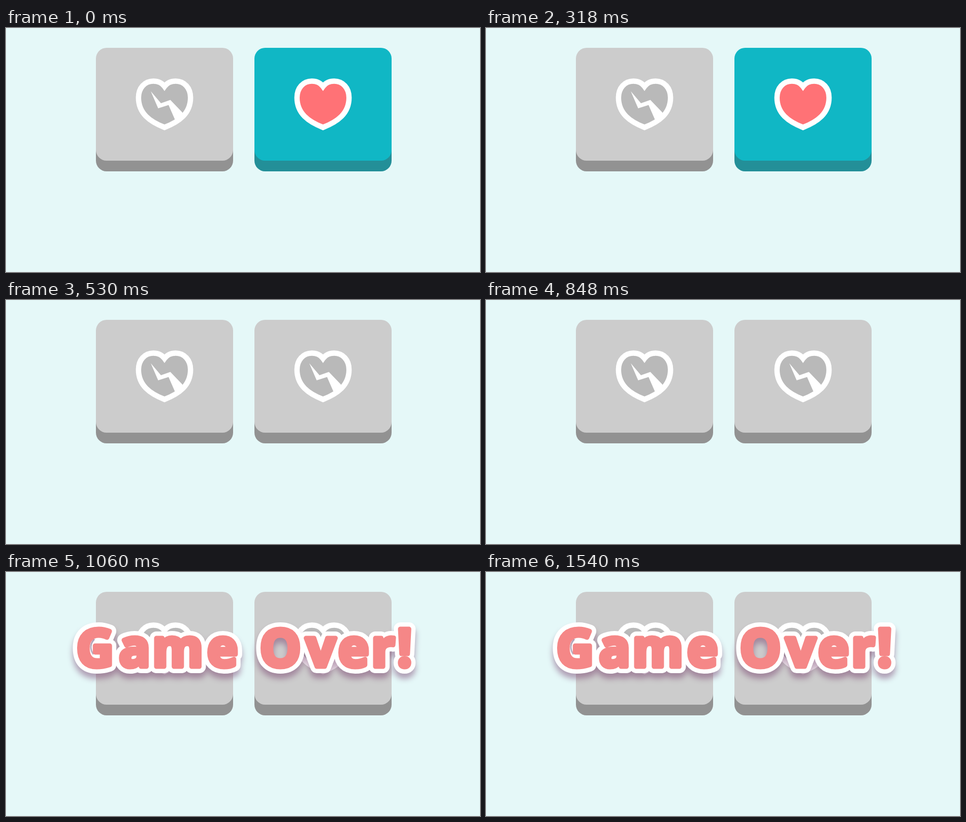
An HTML page with a canvas that plays this animation: 933 px wide and 480 px high, repeating every 1.86 s.

```html
<!DOCTYPE html>
<html lang="en">
<head>
<meta charset="utf-8">
<title>Game Over</title>
<style>
  html, body { margin: 0; width: 100%; height: 100%; overflow: hidden; background: #e5f8f8; }
  canvas { display: block; }
</style>
</head>
<body>
<canvas id="stage" width="933" height="480"></canvas>
<script>
const LOOP = 1860, LOSE_AT = 530, OVER_AT = 1060;
const ALIVE = { top: '#10b7c5', side: '#238f98', heart: '#ff7276' };
const LOST = { top: '#cccccc', side: '#929292', heart: '#b9b9b9' };
const stage = document.getElementById('stage');
const ctx = stage.getContext('2d');

function roundBox(x, y, w, h, r, color) {
  ctx.fillStyle = color;
  ctx.beginPath();
  ctx.roundRect(x, y, w, h, r);
  ctx.fill();
}

function heartPath() {
  ctx.beginPath();
  ctx.moveTo(0, 115);
  ctx.bezierCurveTo(5, 108, 13, 104.5, 22, 104.5);
  ctx.bezierCurveTo(39, 104.5, 51.2, 118, 51.2, 137);
  ctx.bezierCurveTo(51.2, 168, 29, 184, 0, 195.5);
  ctx.bezierCurveTo(-29, 184, -51.2, 168, -51.2, 137);
  ctx.bezierCurveTo(-51.2, 118, -39, 104.5, -22, 104.5);
  ctx.bezierCurveTo(-13, 104.5, -5, 108, 0, 115);
  ctx.closePath();
}

function crack() {
  const points = [[-27, 124.5], [-7, 148], [11.5, 141.5], [35, 166], [38, 172],
                  [24, 184], [20, 179], [8, 151.5], [-12.5, 158]];
  ctx.beginPath();
  points.forEach(([x, y]) => ctx.lineTo(x, y));
  ctx.fillStyle = '#fff';
  ctx.fill();
}

function card(left, look) {
  roundBox(left, 60, 270, 222, 21, look.side);
  roundBox(left, 39, 270, 222, 21, look.top);
  ctx.save();
  ctx.translate(left + 135, 0);
  heartPath();
  ctx.fillStyle = look.heart;
  ctx.fill();
  if (look === LOST) crack();
  heartPath();
  ctx.strokeStyle = '#fff';
  ctx.lineWidth = 10.5;
  ctx.stroke();
  ctx.restore();
}

// Rounded lettering: a bold face fattened by a round stroke, on a white outline.
function makeTitle() {
  const layer = document.createElement('canvas');
  layer.width = stage.width;
  layer.height = stage.height;
  const g = layer.getContext('2d');
  const text = 'GameOver!';
  const centers = [174, 251.5, 338, 426, 540, 620, 684, 745, 784.5];
  const fatten = 9, outline = 8.5, baseline = 185.5;
  g.font = '700 102px "Open Sans", "Noto Sans", sans-serif';
  g.lineJoin = 'round';

  function eachLetter(draw) {
    [...text].forEach((ch, i) => {
      const m = g.measureText(ch);
      draw(ch, centers[i] - (m.actualBoundingBoxRight - m.actualBoundingBoxLeft) / 2);
    });
  }

  g.strokeStyle = '#fff';
  g.lineWidth = fatten + 2 * outline;
  eachLetter((ch, x) => g.strokeText(ch, x, baseline));

  // Openings inside the capitals
  g.globalCompositeOperation = 'destination-out';
  g.beginPath();
  g.ellipse(540, 147, 17, 24, 0, 0, 2 * Math.PI);
  g.fill();
  g.lineWidth = 3;
  g.beginPath();
  g.moveTo(174, 132);
  g.quadraticCurveTo(161, 146, 172, 162);
  g.stroke();
  g.globalCompositeOperation = 'source-over';

  g.fillStyle = g.strokeStyle = '#f58787';
  g.lineWidth = fatten;
  eachLetter((ch, x) => {
    g.strokeText(ch, x, baseline);
    g.fillText(ch, x, baseline);
  });
  return layer;
}

const title = makeTitle();

function draw(t) {
  ctx.fillStyle = '#e5f8f8';
  ctx.fillRect(0, 0, stage.width, stage.height);
  card(177, LOST);
  card(489, t < LOSE_AT ? ALIVE : LOST);
  if (t >= OVER_AT) {
    ctx.save();
    ctx.shadowColor = 'rgba(110, 50, 100, 0.45)';
    ctx.shadowBlur = 12;
    ctx.shadowOffsetY = 10;
    ctx.drawImage(title, 0, 0);
    ctx.restore();
  }
}

const start = performance.now();
function tick() {
  draw((performance.now() - start) % LOOP);
  requestAnimationFrame(tick);
}
tick();
</script>
</body>
</html>
```
